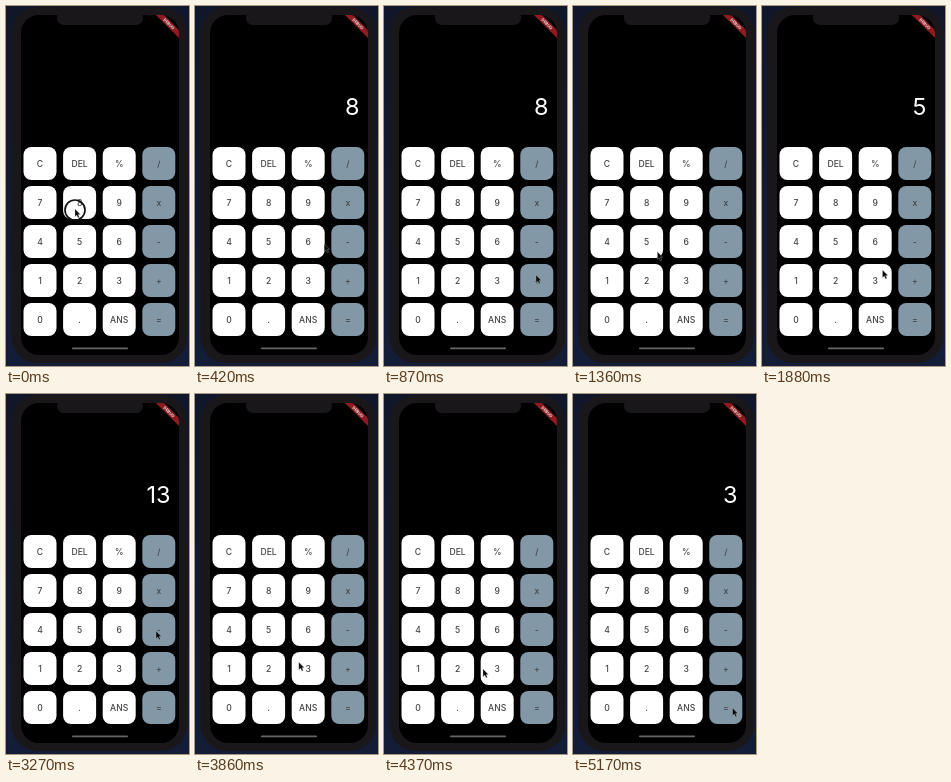
Recreate the animation shown at these times as an HTML page. Size 183 by 360 pixels, loop 5.2 s.

```html
<!DOCTYPE html>
<html lang="en">
<head>
<meta charset="utf-8">
<title>Calculator</title>
<style>
  html, body { margin: 0; width: 100%; height: 100%; overflow: hidden; background: #10172b; }
  svg { display: block; width: 100vw; height: 100vh; }
  text { font-family: Inter, Roboto, sans-serif; }
  .key { font-size: 8.6px; font-weight: 500; fill: #444; text-anchor: middle; }
  #display { font-size: 23.5px; fill: #fff; text-anchor: end; }
  #banner { font-size: 4px; font-weight: 700; fill: #eee; text-anchor: middle; }
</style>
</head>
<body>
<svg viewBox="0 0 183 360">
  <defs>
    <linearGradient id="desk" x2="0" y2="1">
      <stop offset="0" stop-color="#11172a"/>
      <stop offset="1" stop-color="#141d38"/>
    </linearGradient>
    <clipPath id="screen"><rect x="15" y="9" width="158" height="340" rx="18"/></clipPath>
  </defs>
  <rect width="183" height="360" fill="url(#desk)"/>
  <rect x="5.5" y="1" width="175.5" height="356" rx="26" fill="#1a171b"/>
  <g clip-path="url(#screen)">
    <rect x="15" y="9" width="158" height="340"/>
    <g transform="translate(163 18) rotate(45)">
      <rect x="-20" y="-2.9" width="40" height="5.8" fill="#8f1a20"/>
      <text id="banner" y="1.4">DEBUG</text>
    </g>
  </g>
  <rect x="51" y="4" width="86" height="15" rx="7" fill="#1a171b"/>
  <text id="display" x="164.5" y="108.6"></text>
  <g id="keys"></g>
  <rect x="66" y="341.6" width="56" height="1.7" rx=".8" fill="#666"/>
  <g id="cursor">
    <circle id="ring" cy="1" r="10" fill="none" stroke="#111" stroke-width="1.7"/>
    <path d="M0 0V8.8L2 7L3.5 10.2L5 9.5L3.6 6.4H6.2Z" transform="scale(.87)" fill="#080808" stroke="#bbb" stroke-width=".4"/>
  </g>
</svg>
<script>
const LOOP = 5200, TRAVEL = 520, HOLD = 80, RING = 150;
const $ = id => document.getElementById(id);

const labels = 'C DEL % / 7 8 9 x 4 5 6 - 1 2 3 + 0 . ANS ='.split(' ');
$('keys').innerHTML = labels.map((label, i) => {
  const col = i % 4, x = 17.5 + col * 39.6, y = 141 + (i >> 2) * 39;
  return `<rect x="${x}" y="${y}" width="33" height="33" rx="8" fill="${col == 3 ? '#8298a7' : '#fff'}"/>
    <text class="key" x="${x + 16.5}" y="${y + 19.8}">${label}</text>`;
}).join('');

// Each press: when, where, and what the display reads afterwards
const presses = [
  { at: 0, x: 69, y: 203, shows: '8' },
  { at: 880, x: 152, y: 269, shows: '' },
  { at: 1510, x: 74, y: 238, shows: '5' },
  { at: 2220, x: 153, y: 313, shows: '13' },
  { at: 3360, x: 150, y: 237, shows: '' },
  { at: 4400, x: 99, y: 275, shows: '3' },
  { at: LOOP, x: 159.5, y: 314, shows: '' }
];

const clamp = u => Math.min(1, Math.max(0, u));
const smooth = u => u * u * (3 - 2 * u);

function draw(now) {
  const t = now % LOOP;
  const i = presses.findIndex(p => p.at > t);
  const from = presses[i - 1], to = presses[i], since = t - from.at;
  // Sideways motion leads, so the pointer follows a slight arc
  const u = smooth(clamp((since - HOLD) / TRAVEL));
  const x = from.x + (to.x - from.x) * u;
  const y = from.y + (to.y - from.y) * u * u;
  $('cursor').setAttribute('transform', `translate(${x} ${y})`);
  $('ring').style.display = since < RING ? '' : 'none';
  $('display').textContent = since < HOLD ? presses[i - 2]?.shows ?? '' : from.shows;
}

const start = performance.now();
function tick() {
  draw(performance.now() - start);
  requestAnimationFrame(tick);
}
tick();
</script>
</body>
</html>
```
